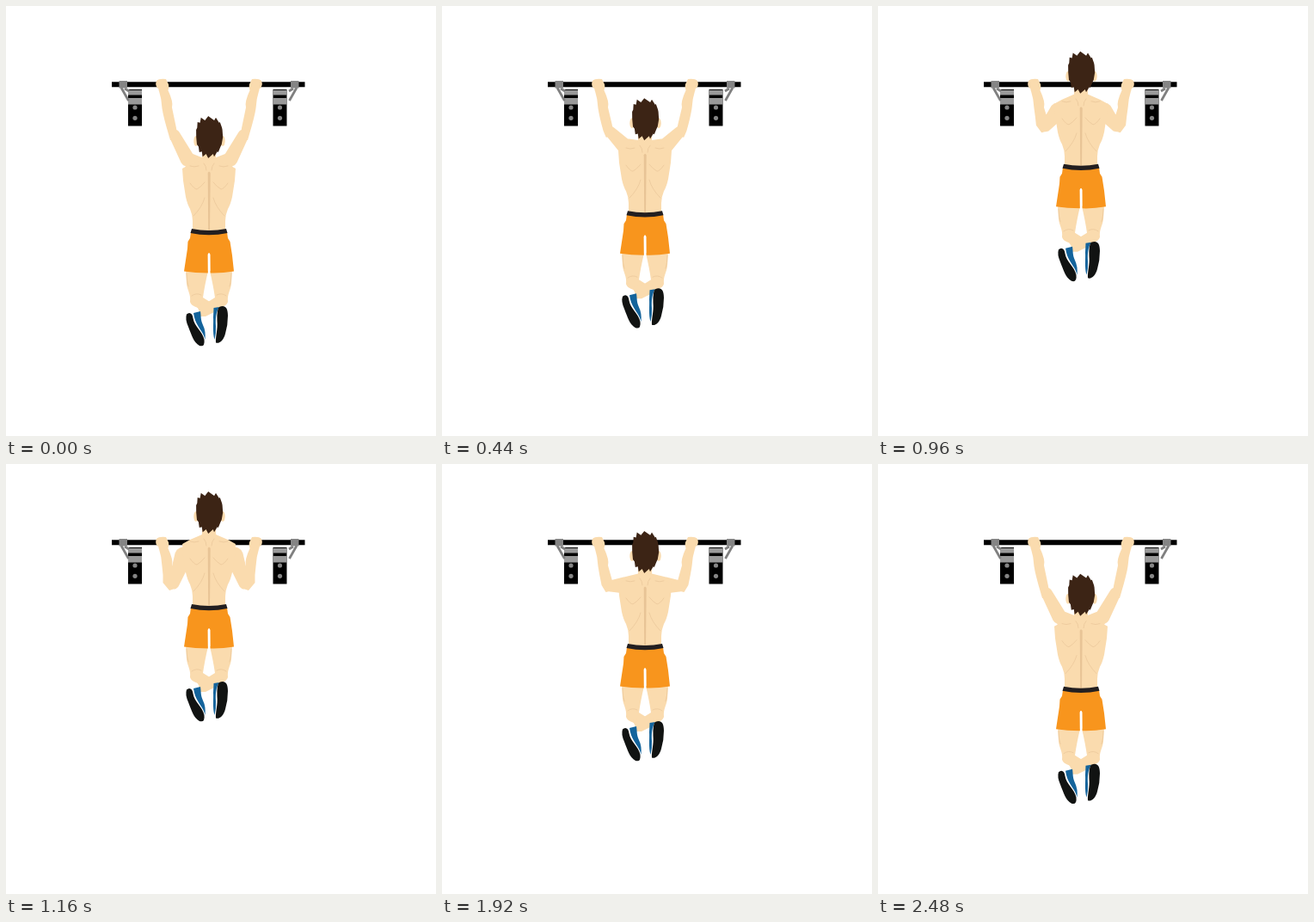
Recreate the animation shown at these times as an HTML page. Size 500 by 500 pixels, loop 2.64 s.

```html
<!DOCTYPE html>
<html lang="en">
<head>
<meta charset="utf-8">
<title>Pull-up</title>
<style>
  html, body { margin: 0; width: 100%; height: 100%; overflow: hidden; background: #fff; }
  svg { display: block; width: 100%; height: 100%; }
  .skin { fill: #fadbae; }
  .line { fill: none; stroke: #ecca9d; stroke-width: .9; stroke-linecap: round; }
  .sole { fill: #111312; }
  .shoe { fill: #14649c; }
  .steel { fill: #858585; }
</style>
</head>
<body>
<svg viewBox="0 0 500 500">
  <defs>
    <g id="plate">
      <path d="M142 97H158V139.500H142z"/>
      <path fill="#999" d="M142 98H158V103.500H142zM142 107H158V114.500H142z"/>
      <circle class="steel" cx="150" cy="118" r="2.600"/>
      <circle class="steel" cx="150" cy="130.300" r="2.600"/>
    </g>
    <g id="clamp">
      <path d="M134 95L142.500 110M138 96L143 99" fill="none" stroke="#808080" stroke-width="2.800"/>
      <path class="steel" d="M131.500 87H141V95.500H131.500z"/>
    </g>
    <g id="limb" class="skin">
      <path d="M175 87Q178 84 186 85L189 91Q190 96 187.500 99H178L177.500 96.500Q172.500 93 175 87z"/>
      <path id="arm"/>
    </g>
    <g id="torso">
      <path class="skin" d="M237 172H228V178L214 184L205 189L206 203L209 222Q211 231 214 236Q217 243 217 250V264H237z"/>
      <path class="line" d="M214 186Q219 188 224 186M230 183Q233 186 233 191M214 206Q219 213 222 213Q226 211 231 205M231 223Q228 234 218 244"/>
    </g>
    <g id="leg">
      <path class="skin" d="M209 306L210 323C211 331 215 335 214 344C216 350 222 349 228 354H237V344L229 339Q231 325 235 308z"/>
      <path class="line" d="M210 311Q210 320 212 326M216 337Q221 333 227 336"/>
    </g>
  </defs>

  <use href="#plate"/>
  <use href="#plate" transform="translate(468.500) scale(-1 1)"/>
  <path d="M123 88.200H347.500V94.200H123z"/>
  <use href="#clamp"/>
  <use href="#clamp" transform="translate(472) scale(-1 1)"/>

  <use href="#limb"/>
  <use href="#limb" transform="translate(472) scale(-1 1)"/>

  <g id="body">
    <use href="#leg"/>
    <use href="#leg" transform="translate(472) scale(-1 1)"/>
    <path class="skin" d="M220 348Q226 353 225 361H232L242 356L244 351L252 348L236 344z"/>
    <path class="shoe" d="M218 357L226 355C227 361 226 364 229 371Q232.500 378 231.500 388C230 379 221 372 219 362z"/>
    <path class="sole" d="M210 358.500C213 355.500 217 357 217.500 363C218.500 372 229 379 230.500 388Q231.500 397 225 395C218 391 216 383 212 373Q208 364 210 358.500z"/>
    <path class="shoe" d="M241.500 351L248 350C244 356 243.500 364 244 372Q244.500 380 242.500 388C240 380 241.500 368 241 362z"/>
    <path class="sole" d="M248 350C254 347.500 258 350 258 360Q258 371 255 381C253 389 248 393 244 391.500C243.500 384 246.500 376 245.500 366Q245 352 248 350z"/>

    <use href="#torso"/>
    <use href="#torso" transform="translate(472) scale(-1 1)"/>
    <path fill="#e8c496" d="M234.700 194Q236 191 237.700 194L237 262H235.200z"/>

    <path fill="#f8951d" d="M215 263H257L258 270L260.500 274L263 290L265 308.500Q250 311 237.700 310.500L237.500 289Q236 285 234.600 289L234.800 310.500Q220 310.500 207 308.500L211 282L211.500 274L214 270z"/>
    <path fill="#231f20" d="M216 259Q236 263 256 259L257.500 264Q236 268.500 214.500 264z"/>

    <ellipse class="skin" cx="221" cy="157" rx="2.700" ry="6"/>
    <ellipse class="skin" cx="252" cy="157" rx="2.700" ry="6"/>
    <path id="hair" fill="#3c2415"/>
  </g>
</svg>
<script>
  const LOOP = 2640, STEP = 40, RISE = 96;
  const $ = id => document.getElementById(id);
  const arm = $("arm"), body = $("body");

  // Rounded oval whose spikes grow towards the crown and the nape.
  function hairPath(spikes) {
    const soft = v => Math.sign(v) * Math.abs(v) ** 0.7;
    const pts = [];
    for (let i = 0; i < spikes * 2; i++) {
      const a = Math.PI * i / spikes, c = Math.cos(a), s = Math.sin(a);
      const tip = i % 2;
      const narrow = 1 - 0.25 * Math.max(0, s);
      const x = 236.7 + 15.5 * narrow * soft(c) - 1.5 * tip * Math.abs(s);
      const y = 152.5 + (tip ? 24.5 : 20) * soft(s);
      pts.push(x.toFixed(1) + " " + y.toFixed(1));
    }
    return "M" + pts.join("L") + "z";
  }

  // Short ramp away from the hang, then a constant speed up to the top.
  function height(t) {
    const time = Math.min(t, LOOP - t);
    const speed = RISE / 920, from = 120, ramp = 240;
    if (time < 160) return 0;
    if (time < from + ramp) return speed * (time - from) ** 2 / (2 * ramp);
    return Math.min(RISE, speed * (time - from - ramp / 2));
  }

  // Tapered limb with round ends between a and b.
  function taper(a, b) {
    const dx = b.x - a.x, dy = b.y - a.y, len = Math.hypot(dx, dy);
    const edge = (p, side) => `${p.x + side * p.r * dy / len} ${p.y - side * p.r * dx / len}`;
    const cap = (p, side) => `A${p.r} ${p.r} 0 0 1 ${edge(p, side)}`;
    return `M${edge(a, 1)}L${edge(b, 1)}${cap(b, -1)}L${edge(a, -1)}${cap(a, 1)}z`;
  }

  // The hand is fixed; elbow and shoulder follow the rise of the body.
  function armPath(up) {
    const k = up / RISE;
    const e = { x: 196 - k, y: 150 - 11 * Math.sin(k * Math.PI / 2), r: 6.5 };
    const s = {
      x: 211 + 3 * Math.sin(k * Math.PI) - 4.5 * k,
      y: 178 + 25 * k - up,
      r: 8.5 + 2 * k
    };
    const forearm = `M188 97Q195 112 193 118L${e.x + 2} ${e.y - 8}L${e.x + 4} ${e.y + 5}` +
      `L${e.x - 5} ${e.y + 6 + 2 * k}L${e.x - 7 - 5.5 * k} ${e.y - 1}` +
      `Q183 129 181.500 119Q181 108 177.500 97z`;
    const trapezius = `M${s.x} ${s.y - s.r}L230 ${177 - up}H236V${200 - up}L206 ${197 - up}L${s.x} ${s.y}z`;
    return forearm + taper(e, s) + trapezius;
  }

  $("hair").setAttribute("d", hairPath(14));

  const start = performance.now();
  function draw(now) {
    const t = Math.max(0, now - start) % LOOP;
    const up = height(Math.floor(t / STEP) * STEP);
    body.setAttribute("transform", `translate(0 ${-up})`);
    arm.setAttribute("d", armPath(up));
    requestAnimationFrame(draw);
  }
  draw(start);
</script>
</body>
</html>
```
